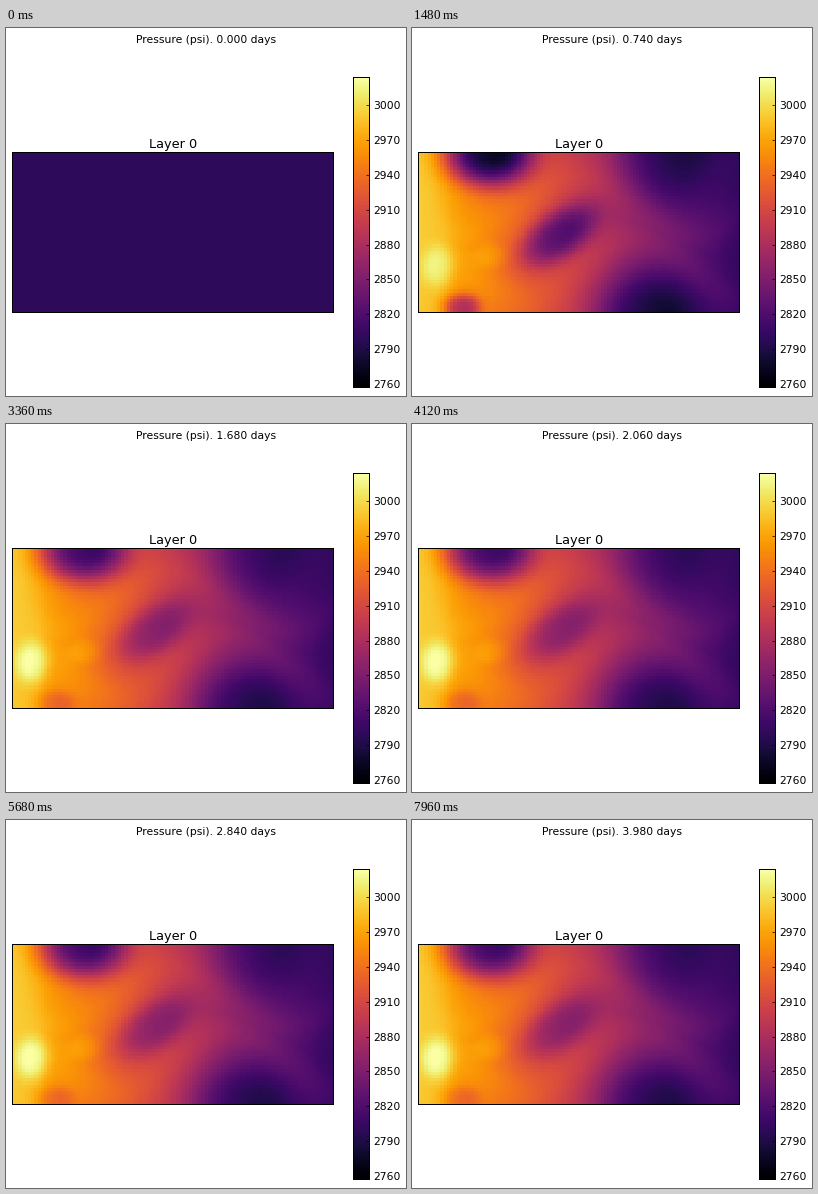
Recreate the animation shown at these times as a matplotlib script. Size 400 by 368 pixels, loop 8000 ms.

```python
import numpy as np
import matplotlib.pyplot as plt
from matplotlib.animation import FuncAnimation

W, H, DPI = 400, 368, 100
FRAMES, STEP = 200, 40
DAY = 0.02                      # days per frame
P_LOW, P_HIGH = 2757.5, 3024.0
START, INLET = 0.16, 0.86       # levels on the colour scale
T_CHANNEL, T_PLUME = 0.22, 0.74

plt.rcParams.update({"font.family": "DejaVu Sans", "axes.linewidth": 0.72})


def px(size):
    return size * 72 / DPI


# Cell centres in stage pixels, 100 x 50 cells
X, Y = np.meshgrid(6 + (np.arange(100) + 0.5) * 3.21,
                   124 + (np.arange(50) + 0.5) * 3.2)
S = (X - 6) / 321               # 0 at the inlet, 1 at the outlet


def blob(cx, cy, sx, sy, angle=0, power=3):
    """Flat-topped elliptical patch."""
    a = np.radians(angle)
    u = (X - cx) * np.cos(a) + (Y - cy) * np.sin(a)
    v = (Y - cy) * np.cos(a) - (X - cx) * np.sin(a)
    return np.exp(-np.hypot(u / sx, v / sy) ** power)


def channel(mid, amp, peak, period):
    """Soft winding band along a cosine path."""
    k = 2 * np.pi / period
    phase = k * (X - peak)
    slope = amp * k * np.sin(phase)
    d = (Y - mid - amp * np.cos(phase)) / np.sqrt(1 + slope**2)
    return 0.8 * np.exp(-0.5 * (d / 12) ** 2) + 0.2 * np.exp(-(d / 30) ** 2)


upper = channel(178, -29, 165, 235)
lower = channel(241, 31, 115, 220)
strip = np.exp(-((X - 6) / 24) ** 2)

# Tight rock: shape, then depth when channels fill, when the plume spreads, at rest
pockets = [(blob(76, 126, 43, 32), 0.14, 0.63, 0.50),
           (blob(146, 208, 42, 22, -35), 0.08, 0.30, 0.17),
           (blob(235, 290, 52, 48), 0.05, 0.25, 0.21),
           (blob(252, 118, 48, 60), 0.03, 0.18, 0.14),
           (blob(50, 280, 18, 14), 0.00, 0.29, 0.10)]


def sunk(stage):
    return sum(p[0] * p[stage] for p in pockets)


drop = INLET - START
ground = START - sunk(1)
cover = 1 - (1 - upper) * (1 - lower) * (1 - strip)
crest = START + drop * (1 - S) ** 1.35
early = ground + cover * (crest - ground) + 0.06 * blob(10, 183, 12, 14)

spot = blob(26, 239, 16, 21)
slope = (INLET - drop * S + 0.035 * np.maximum(upper, lower) * (1 - strip)
         + 0.03 * blob(20, 200, 20, 120) + 0.06 * blob(78, 228, 16, 12))
plume = slope + 0.11 * spot - sunk(2)
settled = slope + 0.15 * spot - sunk(3)


def rise(t, tau, end):
    """Exponential approach that reaches 1 at the end time."""
    return (1 - np.exp(-t / tau)) / (1 - np.exp(-end / tau))


def field(t):
    if t <= 0:
        v = np.full_like(X, START)
    elif t <= T_CHANNEL:
        front = np.exp(-S**2 / 3.7 * (1 / t - 1 / T_CHANNEL))
        v = START + (early - START) * front * rise(t, 0.04, T_CHANNEL)
    elif t <= T_PLUME:
        v = early + (plume - early) * rise(t - T_CHANNEL, 0.4, T_PLUME - T_CHANNEL)
    else:
        v = plume + (settled - plume) * rise(t - T_PLUME, 0.3, np.inf)
    return P_LOW + (P_HIGH - P_LOW) * v


def panel(left, top, right, bottom):
    return fig.add_axes([left / W, 1 - bottom / H, (right - left) / W,
                         (bottom - top) / H])


def label(x, y, text, size):
    return fig.text(x / W, 1 - y / H, text, fontsize=px(size), ha="center",
                    va="baseline")


fig = plt.figure(figsize=(W / DPI, H / DPI), dpi=DPI, facecolor="white")

ax = panel(6, 124, 327, 284)
image = ax.imshow(field(0), cmap="inferno", vmin=P_LOW, vmax=P_HIGH,
                  aspect="auto", interpolation="nearest")
ax.set_xticks([])
ax.set_yticks([])

bar = panel(347, 49, 363, 359)
bar.imshow(np.linspace(0, 1, 256)[:, None], cmap="inferno", origin="lower",
           extent=[0, 1, P_LOW, P_HIGH], aspect="auto")
bar.set_xticks([])
bar.yaxis.tick_right()
bar.set_yticks(range(2760, 3001, 30))
bar.tick_params(axis="y", direction="in", length=px(3), width=px(0.7),
                pad=px(4), labelsize=px(10.7))

label(167, 120, "Layer 0", 12.9)
clock = label(200.5, 15, "", 10.8)


def draw(n):
    t = n * DAY
    image.set_data(field(t))
    clock.set_text(f"Pressure (psi). {t:.3f} days")
    return image, clock


anim = FuncAnimation(fig, draw, frames=FRAMES, interval=STEP, repeat=True,
                     repeat_delay=0, blit=False)
plt.show()
```
